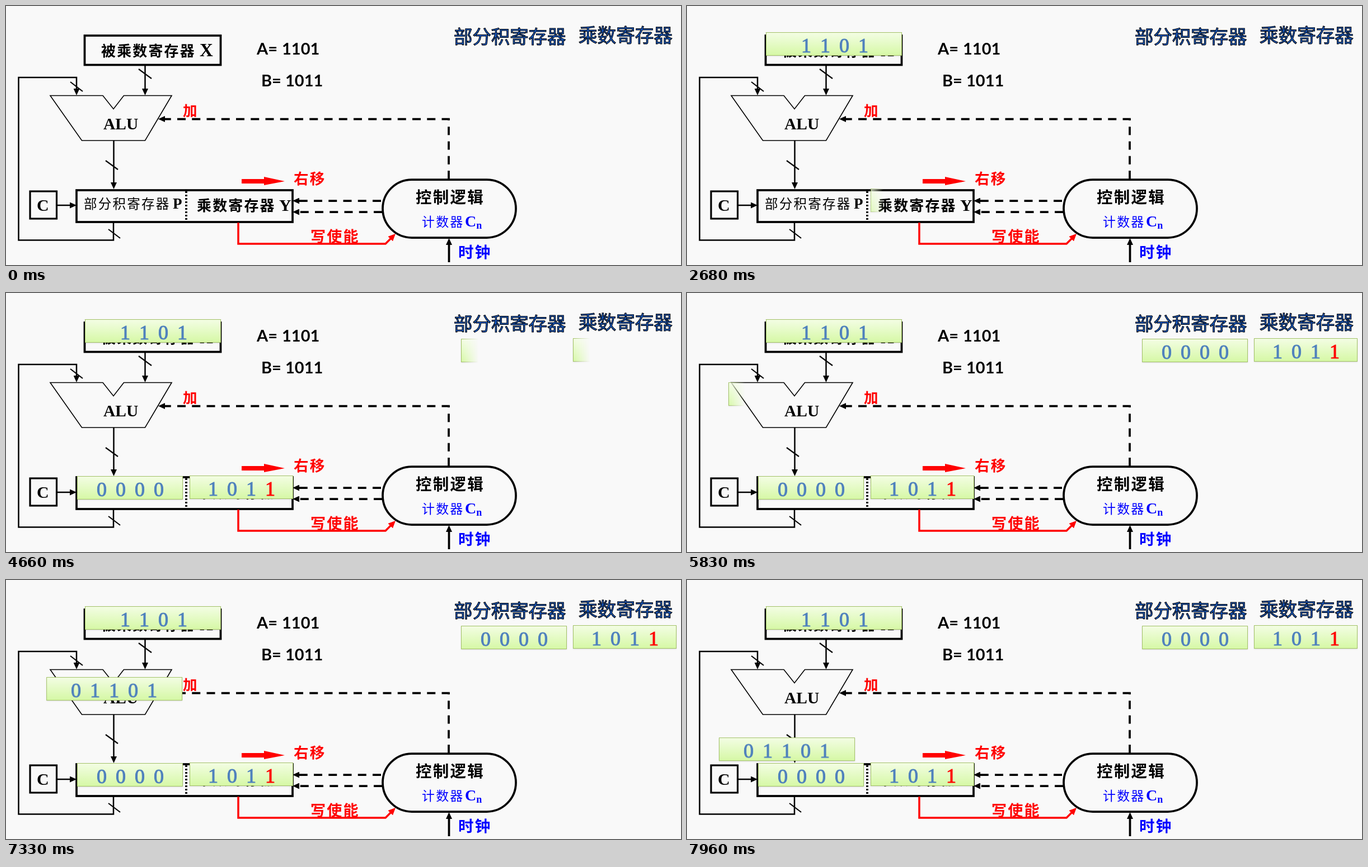
An HTML page that plays this animation: 1206x464 px, repeating every 7.99 s.

```html
<!DOCTYPE html>
<html lang="zh-CN">
<head>
<meta charset="utf-8">
<title>乘法器数据通路</title>
<style>
html, body { margin: 0; width: 100%; height: 100%; overflow: hidden; background: #f9f9f9; }
#stage { position: relative; width: 1206px; height: 464px; overflow: hidden; }
svg { position: absolute; left: 0; top: 0; }

.wire { fill: none; stroke: #000; stroke-width: 2.5; }
.bold { stroke-width: 3.75; }
.dash { stroke-width: 3.75; stroke-dasharray: 15 11.25; }
.red { stroke: #f00; stroke-width: 3.5; }
text { font-family: "Noto Sans CJK SC", "Noto Sans CJK", sans-serif; font-weight: 700; }
.brush { letter-spacing: .14em; }
.light { font-weight: 500; }
.latin { font-family: "Liberation Serif", serif; font-weight: 700; letter-spacing: 0; }
.lato { font: 700 29px Lato, sans-serif; }
.head { font-weight: 400; fill: #1a63d8; stroke: #000; stroke-width: 1.1; }
.r { fill: #f00; }
.b { fill: #00f; }

/* Soft left-to-right wipe: mask position 100% hides, 0 shows */
.panel {
  position: absolute; padding: 1px 4px 5px 1px; margin: -1px 0 0 -1px;
  -webkit-mask-image: linear-gradient(90deg, #000 calc(50% - 15px), transparent calc(50% + 15px));
  -webkit-mask-size: calc(200% + 30px) 100%;
  -webkit-mask-repeat: no-repeat;
  animation: 7990ms linear infinite;
}
.panel div {
  box-sizing: border-box; height: 42px; display: flex;
  border: 1px solid #a3c267;
  background: linear-gradient(#f3fde3, #e6fbc8 45%, #d6f8a6);
  box-shadow: 0 1px 2px rgba(0, 0, 0, .12);
  font: 36px/46px "Liberation Serif", serif;
  color: #4f81bd; -webkit-text-stroke: 1px currentColor;
}
.panel span { width: 34px; text-align: center; }
.panel .r { color: #f00; }
.w4 div { width: 189px; padding-left: 26px; }
.w3 div { width: 185px; padding-left: 24px; }

#x { left: 141px; top: 47px; animation-name: showX; }
#x div { width: 243px; padding-left: 54px; }
#y { left: 328px; top: 327px; animation-name: showY; }
#p { left: 127px; top: 328px; animation-name: showP; }
#p2 { left: 813px; top: 82px; animation-name: showPair; }
#y2 { left: 1013px; top: 81px; animation-name: showPair; }
#sum { left: 74px; top: 160px; animation: showSum 7990ms linear infinite, drop 7990ms linear infinite; }
#sum div { width: 243px; padding-left: 35px; }

@keyframes showX {
  0%, 9.13% { -webkit-mask-position: 100% 0; }
  9.136%, 21.527% { -webkit-mask-position: 96.3% 0; }
  27.159%, 100% { -webkit-mask-position: 0 0; }
}
@keyframes showY {
  0%, 27.528% { -webkit-mask-position: 100% 0; }
  27.534%, 33.166% { -webkit-mask-position: 96.3% 0; }
  38.298%, 100% { -webkit-mask-position: 0 0; }
}
@keyframes showP {
  0%, 38.79% { -webkit-mask-position: 100% 0; }
  38.798%, 44.43% { -webkit-mask-position: 96.3% 0; }
  49.562%, 100% { -webkit-mask-position: 0 0; }
}
@keyframes showPair {
  0%, 57.572% { -webkit-mask-position: 100% 0; }
  62.829%, 100% { -webkit-mask-position: 0 0; }
}
@keyframes showSum {
  0%, 63.198% { -webkit-mask-position: 100% 0; }
  63.204%, 72.59% { -webkit-mask-position: 96.3% 0; }
  77.659%, 100% { -webkit-mask-position: 0 0; }
}
/* Constant acceleration */
@keyframes drop {
  0% { transform: none; }
  87.735% { transform: translate(0, 0); animation-timing-function: cubic-bezier(.3333, 0, .6667, .3333); }
  100% { transform: translate(-18px, 129.7px); }
}
</style>
</head>
<body>
<div id="stage">
<svg width="1206" height="464" viewBox="0 0 1206 464">
  <defs>
    <marker id="tip" markerUnits="userSpaceOnUse" markerWidth="12" markerHeight="11" refX="6" refY="5.5" orient="auto">
      <path d="M0 0L12 5.5L0 11z"/>
    </marker>
    <marker id="tipRed" markerUnits="userSpaceOnUse" markerWidth="13" markerHeight="12" refX="6" refY="6" orient="auto">
      <path d="M0 0L13 6L0 12z" fill="#f00"/>
    </marker>
  </defs>

  <!-- data path -->
  <g class="wire">
    <path d="M192 388V419.500H22.500V128H126V154" marker-end="url(#tip)"/>
    <path d="M248.500 107V154" marker-end="url(#tip)"/>
    <path d="M192.500 241V322" marker-end="url(#tip)"/>
    <path d="M92 357H120" marker-end="url(#tip)"/>
    <path d="M115 136L137 153M237 113L260 130M178 277L200 293M183 400L204 416" stroke-width="2.200"/>
    <path d="M79 160.500H173L192 184.500L210.500 160.500H296L248.500 241H135.500z" stroke-width="1.600"/>
  </g>

  <!-- registers and control -->
  <g class="wire bold">
    <rect x="140.500" y="53" width="243" height="52.500"/>
    <rect x="43" y="332" width="47.500" height="49" stroke-width="3.200"/>
    <rect x="126" y="330" width="386" height="57"/>
    <path d="M322 332V386" stroke-dasharray="3 3"/>
    <rect x="673" y="311" width="238" height="104" rx="52"/>
    <path d="M791.500 459V422" marker-end="url(#tip)"/>
  </g>
  <path class="wire dash" d="M791 310V202.500H278" marker-end="url(#tip)"/>
  <path class="wire dash" d="M670 349H518" marker-end="url(#tip)"/>
  <path class="wire dash" d="M672 369H518" marker-end="url(#tip)"/>
  <path class="wire red" d="M415 388V426H678L691 413" marker-end="url(#tipRed)"/>
  <path class="r" d="M421 310H461V306L498 314L461 321V318H421z"/>

  <!-- labels -->
  <g class="brush">
    <text x="170" y="90" font-size="25.900">被乘数寄存器<tspan class="latin" x="346" font-size="33">X</tspan></text>
    <text class="light" x="139" y="363" font-size="23.500">部分积寄存器<tspan class="latin" x="298" font-size="27">P</tspan></text>
    <text x="341" y="367" font-size="25.900">乘数寄存器<tspan class="latin" x="488" font-size="30">Y</tspan></text>
    <text x="732" y="353" font-size="28.500">控制逻辑</text>
    <text class="b light" x="743" y="395" font-size="22.900">计数器<tspan class="latin" x="820" font-size="28">C</tspan><tspan class="latin" font-size="18" dy="4">n</tspan></text>
    <text class="b" x="808" y="451" font-size="27.500">时钟</text>
    <text class="r" x="316" y="197" font-size="25.500">加</text>
    <text class="r" x="514" y="319" font-size="26.500">右移</text>
    <text class="r" x="544" y="423" font-size="27">写使能</text>
  </g>
  <text class="latin" x="174" y="221" font-size="29.500">ALU</text>
  <text class="latin" x="55" y="367" font-size="30">C</text>
  <text class="lato" x="448" y="87">A=<tspan x="493">1101</tspan></text>
  <text class="lato" x="456" y="143.500">B=<tspan x="499">1011</tspan></text>
  <text class="head" x="800" y="67" font-size="33.400">部分积寄存器</text>
  <text class="head" x="1023" y="65" font-size="33.600">乘数寄存器</text>
</svg>

<div class="panel" id="x"><div><span>1</span><span>1</span><span>0</span><span>1</span></div></div>
<div class="panel w3" id="y"><div><span>1</span><span>0</span><span>1</span><span class="r">1</span></div></div>
<div class="panel w4" id="p"><div><span>0</span><span>0</span><span>0</span><span>0</span></div></div>
<div class="panel w4" id="p2"><div><span>0</span><span>0</span><span>0</span><span>0</span></div></div>
<div class="panel w3" id="y2"><div><span>1</span><span>0</span><span>1</span><span class="r">1</span></div></div>
<div class="panel" id="sum"><div><span>0</span><span>1</span><span>1</span><span>0</span><span>1</span></div></div>
</div>
</body>
</html>
```
